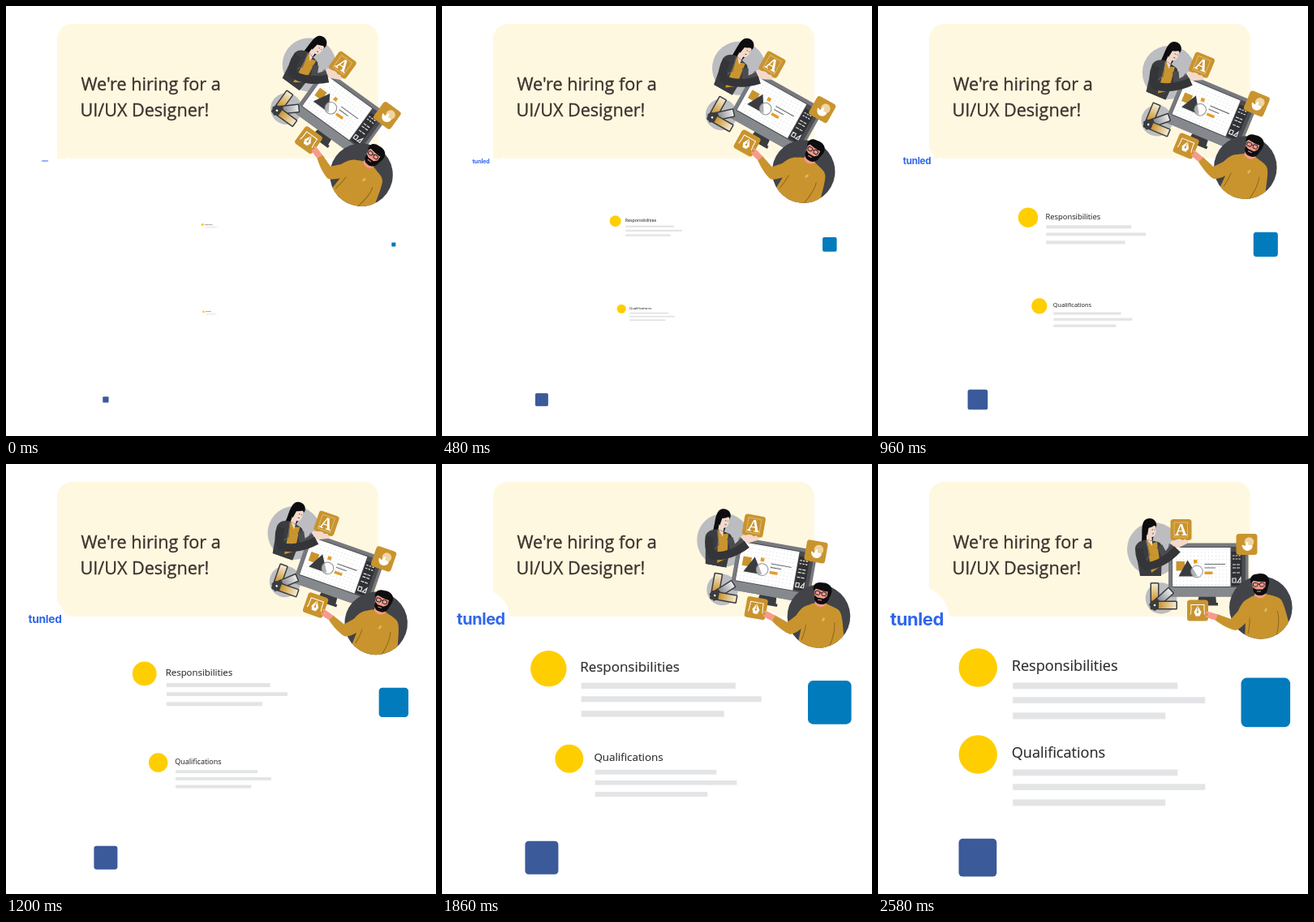
Animation, 530 px wide and 530 px high, one loop 3450 ms. Source, as an HTML page:

```html
<!DOCTYPE html>
<html lang="en">
<head>
<meta charset="utf-8">
<title>Hiring</title>
<style>
  html, body { margin: 0; width: 100%; height: 100%; overflow: hidden; background: #fff; }
  svg { display: block; width: 100vw; height: 100vh; }
  text { font-family: "Open Sans", "Noto Sans", sans-serif; }
  .head { font-size: 21.6px; fill: #3d332d; stroke: #3d332d; stroke-width: .35; }
  .item { font-size: 18.1px; fill: #2b2b2d; stroke: #2b2b2d; stroke-width: .15; }
  .word { font: 700 22px Inter, "Open Sans", sans-serif; fill: #2f66ee; text-anchor: middle; letter-spacing: -.4px; }
  .glyph { font: 600 20px "Noto Serif", "Liberation Serif", serif; fill: #fff; text-anchor: middle; }
  .gold { fill: #c9942e; }
  .dark { fill: #3b3c3f; }
  .black { fill: #0d0d0f; }
  .pale { fill: #f3d9cb; }
  .pink { fill: #f69a8c; }
  .bar { fill: #e3e4e6; }
  .thin { fill: none; stroke: #fff; stroke-width: 1; stroke-linecap: round; stroke-linejoin: round; }
</style>
</head>
<body>
<svg viewBox="0 0 530 530">
  <defs>
    <pattern id="grid" x="363" y="104" width="4.4" height="4.4" patternUnits="userSpaceOnUse">
      <rect width="1" height="1" fill="#d3d4d8"/>
    </pattern>
    <linearGradient id="sheen">
      <stop offset="0" stop-color="#c9942e"/>
      <stop offset="1" stop-color="#f4ead2"/>
    </linearGradient>
    <linearGradient id="steel">
      <stop offset="0" stop-color="#8b8c90"/>
      <stop offset="1" stop-color="#ececee"/>
    </linearGradient>
    <clipPath id="disc"><circle cx="471.8" cy="177" r="38.8"/></clipPath>
    <clipPath id="bust"><path d="M300 60H400V120L352 138H300Z"/></clipPath>
    <g id="lines">
      <circle cx="-128" cy="-20" r="23.7" fill="#ffce00"/>
      <rect class="bar" x="-85" y="-1.5" width="203" height="7.8"/>
      <rect class="bar" x="-85" y="16.3" width="237" height="7.6"/>
      <rect class="bar" x="-85" y="35.4" width="188" height="8"/>
    </g>
    <rect id="tile" class="gold" x="-13" y="-13" width="26" height="26" rx="3.5"/>
    <rect id="swatch" class="dark" x="-5" y="-5.5" width="33" height="11" rx="1.5"/>
  </defs>

  <path d="M63 188V40a18 18 0 0 1 18-18H441a18 18 0 0 1 18 18V170a18 18 0 0 1-18 18Z" fill="#fff8e1"/>
  <circle cx="75.7" cy="187.4" r="1.6" fill="#fff"/>
  <text class="head" x="92.5" y="104">We're hiring for a</text>
  <text class="head" x="91.5" y="135.5">UI/UX Designer!</text>

  <g id="word">
    <circle r="41" cx="-1" fill="#fff"/>
    <text class="word" y="8">tunled</text>
  </g>
  <g id="resp"><use href="#lines"/><text class="item" x="-86.5" y="-16">Responsibilities</text></g>
  <g id="qual"><use href="#lines"/><text class="item" x="-86.5" y="-16">Qualifications</text></g>
  <g id="azure"><rect x="-30.3" y="-30.3" width="60.6" height="60.6" rx="7" fill="#027bbd"/></g>
  <g id="navy"><rect x="-23.4" y="-23.4" width="46.8" height="46.8" rx="5" fill="#3b5a9a"/></g>

  <g id="art">
    <circle cx="340" cy="105" r="33" fill="#bcbdc1"/>
    <circle cx="349" cy="165.5" r="19.3" fill="#bcbdc1"/>

    <!-- monitor -->
    <path class="dark" d="M396 160H416L417 171H419V174.500H391V171H394Z"/>
    <rect x="358" y="97.5" width="98.5" height="66" rx="3" fill="#77797e"/>
    <path d="M358 152H456.500V160.500a3 3 0 0 1-3 3H361a3 3 0 0 1-3-3Z" fill="#85888d"/>
    <rect x="362.5" y="102" width="90.500" height="50" fill="#4b4c50"/>
    <rect x="363" y="103" width="71.500" height="48" fill="#fff"/>
    <rect x="363" y="103" width="71.500" height="48" fill="url(#grid)"/>
    <rect x="435.5" y="108" width="13" height="42" fill="#303134"/>
    <g fill="none" stroke="#e6e6e8" stroke-width="1.2">
      <path d="M437 113H447M437 117H447" stroke-dasharray="2.5 1.2"/>
      <path d="M437 124H447M437 128H447M437 134H447" stroke-dasharray="4 1"/>
      <path d="M437 141H441V146H437ZM443 146L447 140V146Z"/>
    </g>
    <rect class="gold" x="367.5" y="120" width="10.5" height="11.5"/>
    <path class="dark" d="M370.5 138.5L381.5 118.5L394 138.5Z"/>
    <circle cx="393" cy="132.5" r="7.3" fill="#ffffff99" stroke="#8d8f93" stroke-width="1"/>
    <rect x="389" y="118" width="4.5" height="4.5" fill="#e39d2b"/>
    <path d="M402.5 123.5H428M402.5 128H416" stroke="#6b6c70" stroke-width="1.1"/>
    <rect x="402.5" y="132.5" width="10" height="3.5" fill="#e39d2b"/>

    <!-- colour fan -->
    <g transform="translate(341 174)">
      <g transform="rotate(-90)">
        <use href="#swatch"/>
        <rect x="5" y="-4" width="21.5" height="8" fill="url(#sheen)"/>
      </g>
      <g transform="rotate(-42)">
        <use href="#swatch"/>
        <rect x="8" y="-4" width="18.5" height="8" fill="url(#steel)"/>
      </g>
      <use href="#swatch"/>
      <rect x="5" y="-4" width="21.5" height="8" fill="url(#sheen)"/>
      <circle r="1.300" fill="#fff"/>
    </g>

    <!-- designer at the top -->
    <path class="black" d="M325 95C326 86 324 76 328 70C332 65 341 66 343 73C344 77 342 80 341 82L338 97Z"/>
    <path class="pale" d="M331 79C334 75 340 75 342.5 77V84C342 88 340 90 337.500 90L338 98L331 97V86Z"/>
    <path class="black" d="M328 83C327 74 334 68 342 73C341 77 336 78 333.500 79L332 88Z"/>
    <path d="M337.500 81H339M340.500 81H341.500M338 86L340 85.500" stroke="#3b3c3f" stroke-width=".8"/>
    <g clip-path="url(#bust)">
      <path class="dark" d="M317 103C319 96 325 94 331 93L345 96C350 97 351 104 350 112L349 138H323Z"/>
      <path class="gold" d="M331 94L338 98L344 96L348 126L337 134Z"/>
      <path class="pale" d="M331 93L338 95V101Z"/>
      <path d="M330 94L335 112L331 118" fill="none" stroke="#65666a" stroke-width="1"/>
    </g>
    <path class="pale" d="M360 97C364 92 368 94 368 97L379 93C383 93 384 96 381 98L371 103L363 104Z"/>
    <path d="M347 101L354 114L364 101" fill="none" stroke="#4b4c50" stroke-width="7.5" stroke-linejoin="round"/>
    <path d="M322 104C322 113 325 121 330 126C343 126 358 117 369 105" fill="none" stroke="#343538" stroke-width="10" stroke-linejoin="round"/>

    <!-- tiles -->
    <g transform="translate(373.5 81)">
      <use href="#tile"/>
      <path class="thin" d="M-8 -9H8V9H-8Z" stroke-width=".6" opacity=".35"/>
      <text class="glyph" y="7">A</text>
    </g>
    <path class="pale" d="M365 95C369 92 373 92 375 94L379 92.5L381 95L371 100Z"/>
    <g transform="translate(454.5 99)">
      <use href="#tile"/>
      <circle cx="3" cy="-3" r="5.8" fill="#f0d5a2"/>
      <path d="M-6 1C-4 0 -3 2 -2 2L0 -3C2 -4 2 0 2 1L7 1C8 5 4 8 1 8C-3 8 -5 5 -6 1Z" fill="#fff"/>
    </g>
    <g transform="translate(394 180.5)">
      <use href="#tile"/>
      <path class="thin" d="M-8 -7H8M-8 -7C-8 0 -8 3 -9 5M8 -7C8 0 8 3 9 5"/>
      <path d="M0 -6L4.5 2L2.5 7H-2.5L-4.5 2Z" fill="#fff"/>
      <path d="M0 -5V1" stroke="#c9942e" stroke-width=".9"/>
      <circle cy="2" r="1.3" class="gold"/>
    </g>

    <!-- designer at the bottom -->
    <circle cx="471.8" cy="177" r="38.8" fill="#414348"/>
    <g clip-path="url(#disc)">
      <path class="gold" d="M454 169C458 163 464 162 468 161L478 160C487 163 495 163 498 169C502 177 504 188 508 201V218H452Z"/>
      <path d="M492 181C495 190 494 199 491 212M457 181C459 190 458 200 456 209" fill="none" stroke="#8f671c" stroke-width="1"/>
    </g>
    <path class="gold" d="M460 165C451 166 447 174 444 181L435 191L418 185L415 192C424 199 434 204 441 205C448 203 457 192 462 184Z"/>
    <path class="pink" d="M419 185.5L411 183L405 181.5L403.5 183L408 186L403.5 187L405 189L410 191L416 192.5Z"/>
    <path class="pink" d="M464 153H478V161C476 166 468 167 464 162Z"/>
    <path class="pink" d="M461 143H479L480.5 152C478 159 466 160 462 154Z"/>
    <path class="black" d="M460 147C457 140 461 135.500 468 135.500C476 133.500 483.500 138 482 147L480 155C479 160 475 162.500 470 162C465 162 462 158 462 152L466 154.500H474L477.500 151V145C471 146 466 144 462.500 144Z"/>
    <path d="M467 157H472" stroke="#f69a8c" stroke-width="1"/>
    <g fill="none" stroke="#26262a" stroke-width="1">
      <rect x="462.500" y="146.500" width="5.5" height="4.5" rx="1.5"/>
      <rect x="470.5" y="146.500" width="5.5" height="4.5" rx="1.5"/>
      <path d="M468 148H470.500"/>
    </g>
    <path d="M478 177L480 179L478 183L476 181Z" fill="#e1b65e"/>
  </g>
</svg>
<script>
  const LOOP = 3450, STEP = 30;
  const TURN = 36, TURN_MS = 2580;

  // id, centre x, centre y, first scale, time to reach full size
  const growers = [
    ['word', 48, 191, .12, 2090],
    ['resp', 251.25, 271, .07, 1995],
    ['qual', 251.25, 378, .06, 2580],
    ['azure', 477.8, 293.9, .083, 2130],
    ['navy', 122.9, 485.2, .155, 2180]
  ].map(([id, ...rest]) => [document.getElementById(id), ...rest]);
  const art = document.getElementById('art');

  function draw(time) {
    const t = Math.floor((time % LOOP) / STEP) * STEP;
    for (const [el, x, y, from, ms] of growers) {
      const s = from + (1 - from) * Math.min(1, t / ms);
      el.setAttribute('transform', `translate(${x} ${y}) scale(${s})`);
    }
    const angle = TURN * (1 - Math.min(1, t / TURN_MS));
    art.setAttribute('transform', `rotate(${angle} 407 140.5)`);
  }

  const start = performance.now();
  function tick() {
    draw(performance.now() - start);
    requestAnimationFrame(tick);
  }
  tick();
</script>
</body>
</html>
```
